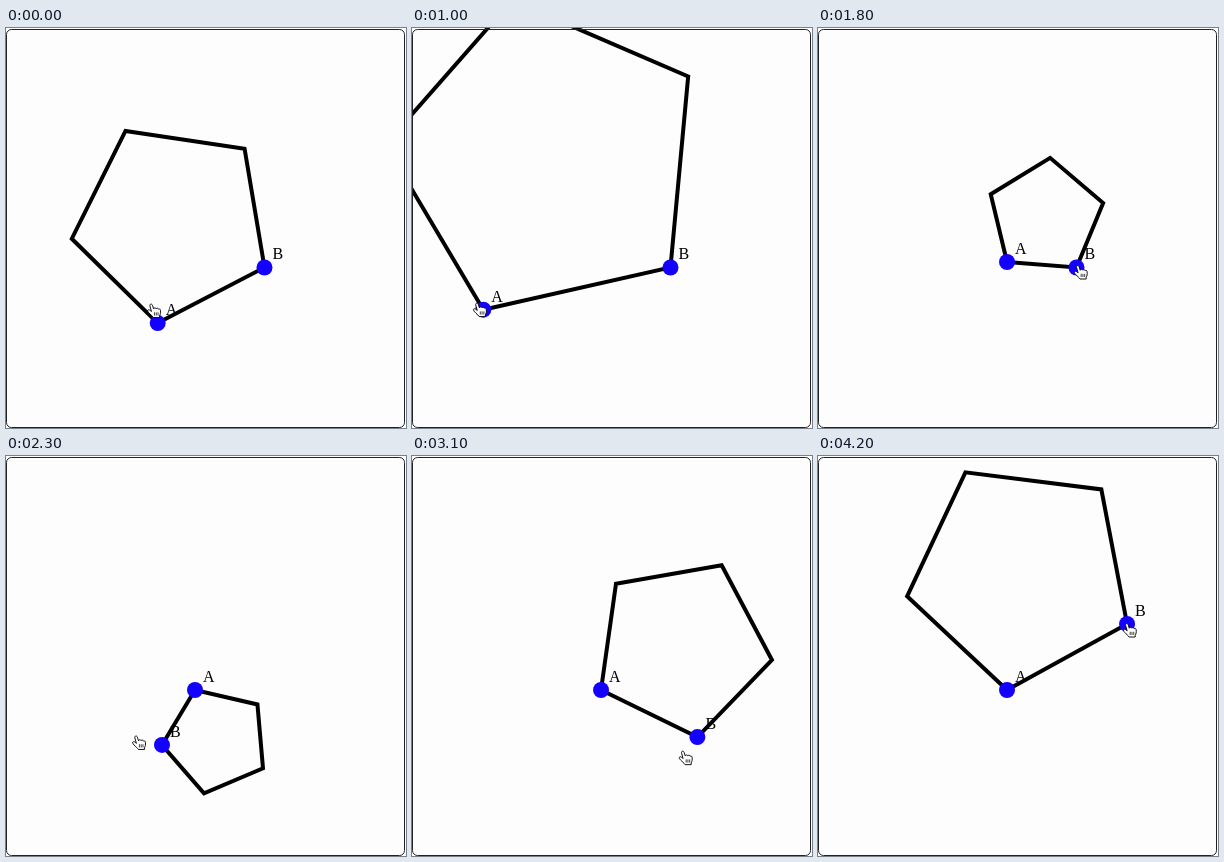
An HTML page that plays this animation: 400x400 px, repeating every 4.3 s.

```html
<!DOCTYPE html>
<html lang="en">
<head>
<meta charset="utf-8">
<title>Draggable pentagon</title>
<style>
  html, body { margin: 0; width: 100%; height: 100%; overflow: hidden; background: #fff; }
  svg { display: block; width: 100vw; height: 100vh; }
  text { font: 16px "Liberation Serif", "Times New Roman", serif; }
  .frame { x: .5px; y: 1.5px; width: 398px; height: 398px; rx: 5px; }
</style>
</head>
<body>
<svg viewBox="0 0 400 400">
  <rect class="frame" fill="#fdfdfd"/>
  <polygon id="shape" fill="none" stroke="#000" stroke-width="4"/>
  <g id="a"><circle r="8" fill="#1400ff"/><text x="8" y="-8">A</text></g>
  <g id="b"><circle r="8" fill="#1400ff"/><text x="8" y="-8">B</text></g>
  <rect class="frame" fill="none" stroke="#222"/>
  <g id="hand" stroke="#000" stroke-linecap="round" stroke-linejoin="round">
    <g transform="scale(.93)">
      <path fill="#fff" d="M-1.6 1.2C-2-.8.6-1.2 1.2.8L2.4 4.6C3 3.2 4.8 3.2 5.2 4.5
        C6 3.5 7.3 3.7 7.7 5C8.8 4.3 9.8 5 9.8 6.3C10.2 9 9.6 10.6 8.8 12.2L8.8 14L2.2 14
        C1.4 12.4-1 10.8-2.4 9.2C-4.4 7-4.4 5.8-3 5.6C-1.8 5.5-1 6.6-.2 7.2Z"/>
      <path fill="none" stroke-width=".8" d="M3.4 8.8V11.4M5.3 8.8V11.4M7.2 8.8V11.4"/>
    </g>
  </g>
</svg>
<script>
const LOOP = 4300, STEP = 100;
const $ = id => document.getElementById(id);
const clamp = (v, lo, hi) => Math.min(hi, Math.max(lo, v));

// Each drag swings one corner around the other; keys are [ms, degrees, radius]
const dragA = {
  pivot: [258.5, 239.5], lead: 40,
  keys: [
    [0, 152.5, 120.4], [200, 201, 111], [400, 270, 67], [600, 379, 47], [800, 484, 83],
    [1000, 527.3, 191.9], [1200, 541.4, 205], [1400, 569.7, 93.8], [1700, 544.5, 69.7]
  ]
};
const dragB = {
  pivot: [189, 234], lead: 80,
  keys: [
    [2000, 4.5, 69.7], [2300, 121, 64.1], [2600, 208, 127], [2700, 282.4, 116.7], [2900, 332, 132],
    [3200, 413, 99], [3600, 517.2, 123.7], [3800, 570, 100], [4200, 691.2, 137]
  ]
};

// Smooth curve through column c of the keys
function curve(keys, c, t) {
  const last = keys.length - 1;
  const i = clamp(keys.findIndex(k => k[0] > t) - 1, 0, last - 1);
  const slope = n => {
    const p = keys[Math.max(n - 1, 0)], q = keys[Math.min(n + 1, last)];
    return (q[c] - p[c]) / (q[0] - p[0]);
  };
  const from = keys[i], to = keys[i + 1], span = to[0] - from[0];
  const k = (t - from[0]) / span, m = 1 - k;
  return m * m * ((1 + 2 * k) * from[c] + k * span * slope(i))
       + k * k * ((3 - 2 * k) * to[c] - m * span * slope(i + 1));
}

const startOf = drag => drag.keys[0][0];
const endOf = drag => drag.keys.at(-1)[0];

function swing({ pivot, keys }, t) {
  // Stop just short of the end so the last span is found
  const time = clamp(t, keys[0][0], keys.at(-1)[0] - .01);
  const angle = curve(keys, 1, time) * Math.PI / 180, r = curve(keys, 2, time);
  return [pivot[0] + r * Math.cos(angle), pivot[1] + r * Math.sin(angle)];
}

// The pointer runs ahead of the corner, less and less
function chase(drag, t) {
  const left = (endOf(drag) - t) / (endOf(drag) - startOf(drag));
  return swing(drag, t + drag.lead * clamp(left, 0, 1));
}

function pointer(t) {
  if (t <= 1600) return chase(dragA, t);
  if (t > startOf(dragB)) return chase(dragB, t);
  const from = chase(dragA, 1600), to = [260, 238];
  const k = clamp((t - 1600) / 200, 0, 1);
  return from.map((v, i) => v + (to[i] - v) * k);
}

function pentagon(a, b) {
  const pts = [a, b];
  let [x, y] = b, angle = Math.atan2(y - a[1], x - a[0]);
  const side = Math.hypot(x - a[0], y - a[1]);
  for (let i = 0; i < 3; i++) {
    angle -= Math.PI * 2 / 5;
    pts.push([x += side * Math.cos(angle), y += side * Math.sin(angle)]);
  }
  return pts;
}

const place = (id, p) => $(id).setAttribute("transform", `translate(${p})`);

function draw(ms) {
  const t = Math.floor(ms / STEP) * STEP;
  const a = swing(dragA, t), b = swing(dragB, t);
  $("shape").setAttribute("points", pentagon(a, b).join(" "));
  place("a", a);
  place("b", b);
  place("hand", pointer(t));
}

const start = performance.now();
function tick() {
  draw((performance.now() - start) % LOOP);
  requestAnimationFrame(tick);
}
tick();
</script>
</body>
</html>
```
